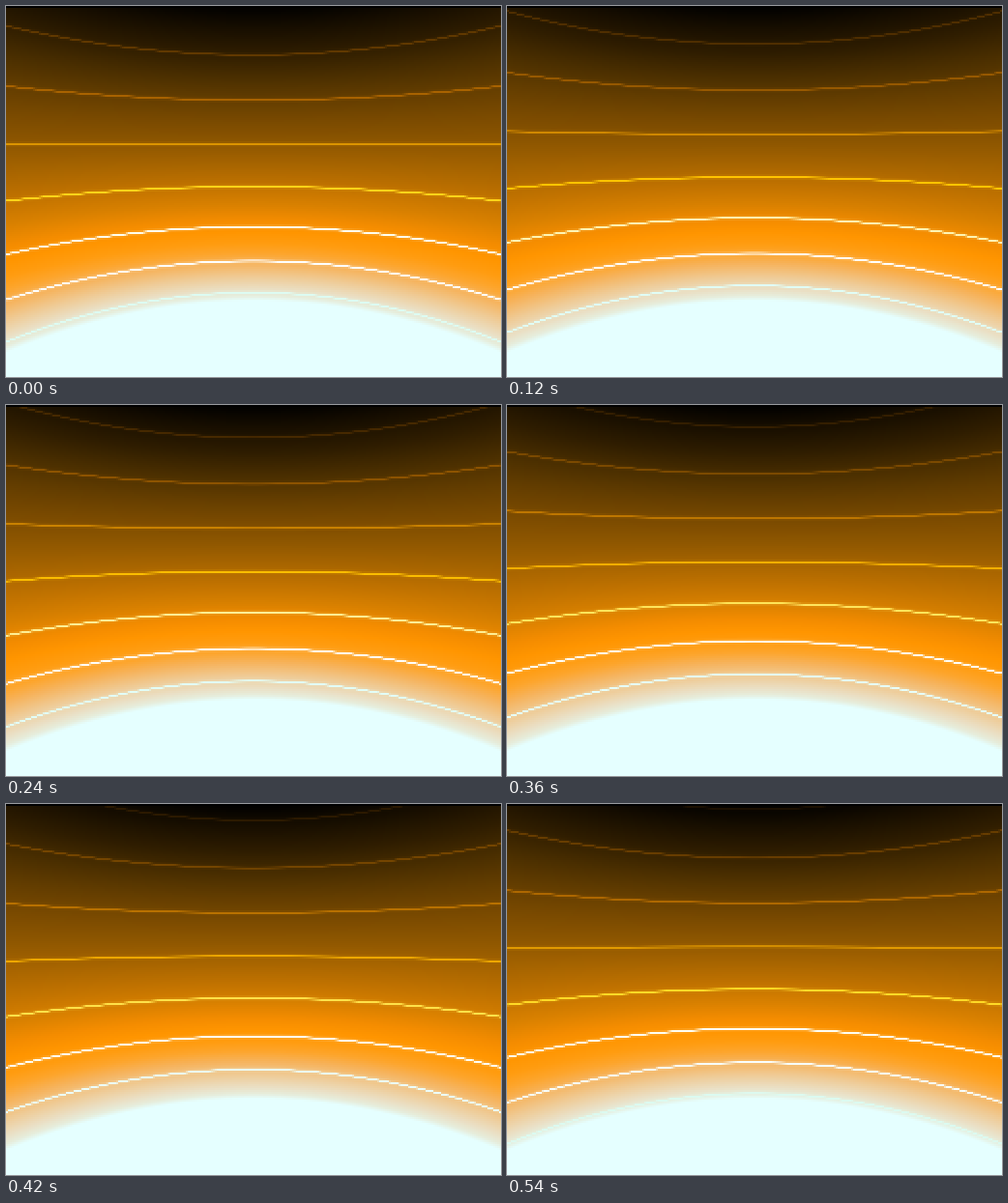
An HTML page with a canvas that plays this animation: 512 px wide and 384 px high, repeating every 0.6 s.

```html
<!DOCTYPE html>
<html lang="en">
<head>
<meta charset="utf-8">
<title>Glowing horizon</title>
<style>
html, body { margin: 0; width: 100%; height: 100%; overflow: hidden; background: #000; }
canvas { display: block; width: 100%; height: 100%; image-rendering: pixelated; }
</style>
</head>
<body>
<canvas id="stage" width="256" height="192"></canvas>
<script>
const W = 256, H = 192, CELL = 2;
const STEP_MS = 60;
const PHASES = [0, 1, 2, 2, 3, 4, 5, 6, 7, 8]; // one step is held twice
const HORIZON = 142, BEND = 0.33;
const GLOW_EDGE = 304;

// Height of successive lines on the middle axis
const SPACING = [-50, 0, 50.6, 97.5, 142.9, 187, 228.5, 263.9, 296.7, 324];

const SKY = ramp([
  [0, '000000'], [20, '140c00'], [50, '2f1d00'], [75, '4b2f00'],
  [97, '633d00'], [120, '7a4a00'], [143, '8f5700'], [165, 'a86500'],
  [187, 'c27300'], [205, 'd88000'], [222, 'f48c00'], [234, 'ff9500'],
  [246, 'ff9c10'], [256, 'fda52c'], [266, 'f6b25a'], [280, 'efca94'],
  [293, 'eadfc4'], [300, 'e6eddc'], [305, 'e5ffff']
]);
const LINE = ramp([
  [0, '140b00'], [20, '301c00'], [50, '603800'], [72, '7c4a00'],
  [97, 'a86200'], [120, 'c07800'], [143, 'dc9400'], [160, 'f0aa00'],
  [177, 'ffc400'], [190, 'ffd820'], [205, 'ffe458'], [219, 'fff4b0'],
  [229, 'fffff0'], [263, 'ffffff'], [280, 'e4fffa'], [300, 'dcfaf0']
]);

const ctx = document.getElementById('stage').getContext('2d');
const image = ctx.createImageData(W, H);

function ramp(stops) {
  return stops.map(([at, hex]) => {
    const n = parseInt(hex, 16);
    return [at, n >> 16, n >> 8 & 255, n & 255];
  });
}

function mix(a, b, t) {
  return a + (b - a) * t;
}

function clamp(v) {
  return Math.max(0, Math.min(1, v));
}

function sample(stops, at) {
  let i = 1;
  while (i < stops.length - 1 && stops[i][0] < at) i++;
  const a = stops[i - 1], b = stops[i];
  const t = clamp((at - a[0]) / (b[0] - a[0]));
  return [1, 2, 3].map(k => mix(a[k], b[k], t));
}

function linesAt(phase) {
  return SPACING.slice(1).map((y, i) => mix(y, SPACING[i], phase))
    .filter(y => y < GLOW_EDGE);
}

function draw(phase) {
  const lines = linesAt(phase);
  const data = image.data;
  for (let j = 0; j < H; j++) {
    const y = (j + 0.5) * CELL;
    for (let i = 0; i < W; i++) {
      const u = (i + 0.5) / (W / 2) - 1;
      const bend = BEND * u * u;
      // Unbend the arc: its height where it crosses the middle axis
      const c = (y + HORIZON * bend) / (1 + bend);
      let rgb = j ? sample(SKY, c) : [0, 0, 0];
      if (j && c < GLOW_EDGE) {
        const gap = Math.min(...lines.map(l => Math.abs(l - c))) * (1 + bend);
        const core = clamp((1.3 - gap) / 0.6);
        const halo = 0.12 * clamp((3.5 - gap) / 2);
        const alpha = Math.max(core, halo);
        if (alpha > 0) {
          const ink = sample(LINE, c);
          rgb = rgb.map((v, k) => mix(v, ink[k], alpha));
        }
      }
      data.set([...rgb, 255], (j * W + i) * 4);
    }
  }
  ctx.putImageData(image, 0, 0);
}

let shown = -1;
function tick() {
  const step = PHASES[Math.floor(performance.now() / STEP_MS) % PHASES.length];
  if (step !== shown) draw((shown = step) / 9);
  requestAnimationFrame(tick);
}
tick();
</script>
</body>
</html>
```
